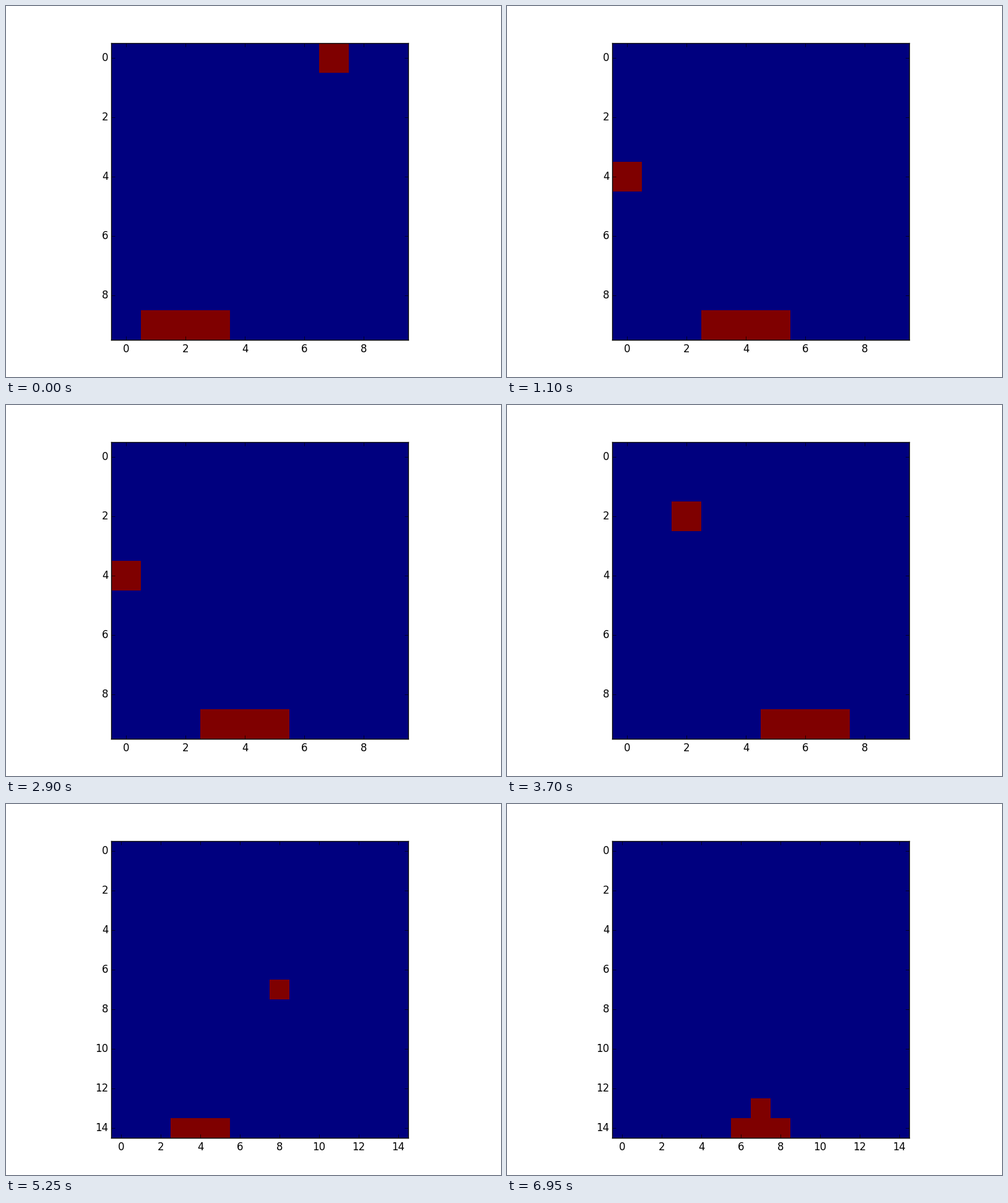
Recreate the animation shown at these times as a matplotlib script. Size 800 by 600 pixels, loop 7 s.

```python
import numpy as np
import matplotlib.pyplot as plt
from matplotlib.animation import FuncAnimation

plt.style.use("classic")
plt.rcParams.update({"font.family": "DejaVu Sans", "figure.facecolor": "white",
                     "ytick.major.pad": 3.28})

FRAMES, INTERVAL = 140, 50
SWITCH = 90       # the small board runs until here, then the large one
LARGE_START = 84  # the large board joins in the middle of a game

# (fruit column, first basket centre) of each game
SMALL = [(7, 2), (3, 3), (0, 6), (4, 7), (6, 7),
         (4, 1), (0, 6), (7, 4), (2, 4), (5, 3)]
LARGE = [(12, 12), (8, 6), (8, 2), (7, 12)]

fig = plt.figure(figsize=(8, 6), dpi=100)
ax = fig.add_subplot(111)


def basket_at(row, start, aim, size):
    """Drift two cells away from the aim, wait, return just in time."""
    side = 1 if start >= aim else -1
    away = abs(start - aim) + min(row, 2)
    time_left = max(size - 3 - row, 0)
    return int(np.clip(aim + side * min(away, time_left), 1, size - 1))


def board(i):
    if i < SWITCH:
        size, games, step, offset = 10, SMALL, i, 1
    else:
        size, games, step, offset = 15, LARGE, i - LARGE_START, 0
    game, row = divmod(step, size - 1)
    fruit, start = games[game]
    basket = basket_at(row, start, fruit + offset, size)
    cells = np.zeros((size, size))
    cells[row, fruit] = 1
    cells[-1, basket - 1:basket + 2] = 1
    return cells


def draw(i):
    cells = board(i)
    ticks = range(0, len(cells), 2)
    ax.clear()
    im = ax.imshow(cells, cmap="jet", vmin=0, vmax=1, interpolation="nearest")
    ax.set_xticks(ticks)
    ax.set_yticks(ticks)
    return [im]


anim = FuncAnimation(fig, draw, frames=FRAMES, interval=INTERVAL,
                     repeat=True, repeat_delay=0, blit=False)
plt.show()
```
